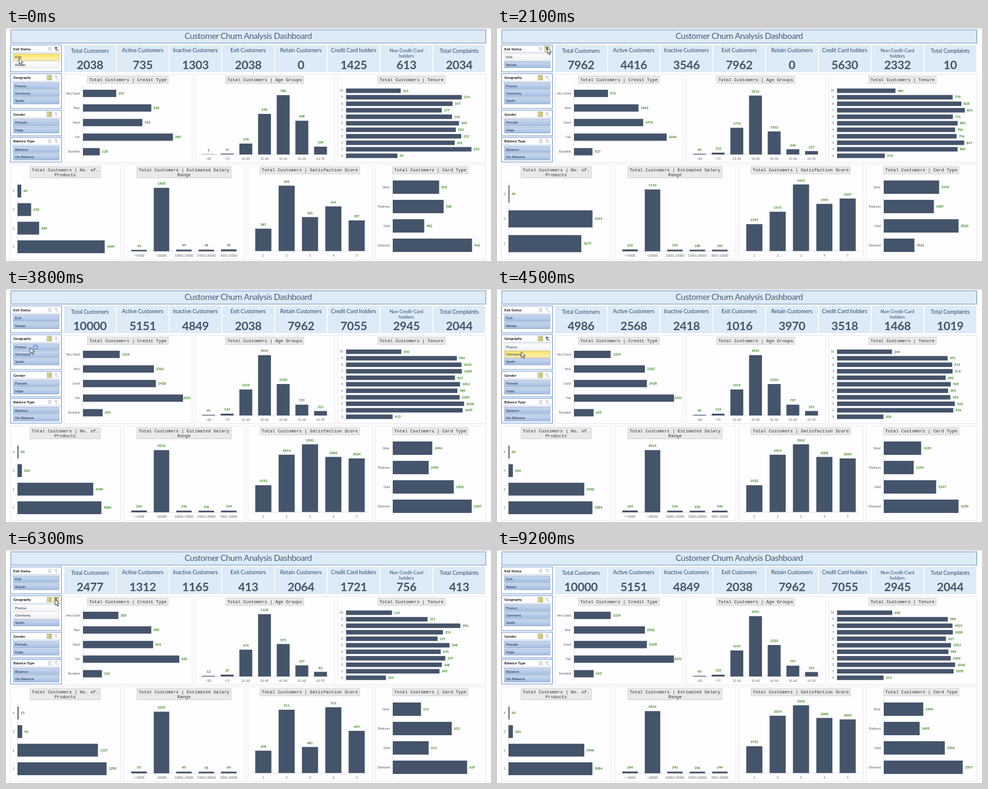
These frames come from a looping animation (800 by 385 pixels, 9300 ms). An HTML page:

```html
<!DOCTYPE html>
<html lang="en">
<head>
<meta charset="utf-8">
<title>Customer Churn Analysis Dashboard</title>
<style>
html, body { margin: 0; width: 100%; height: 100%; overflow: hidden; background: #fff; }
svg { display: block; width: 800px; height: 385px; font-family: Lato, "Open Sans", sans-serif; }
.title { font-size: 14px; letter-spacing: -.45px; fill: #4a5c78; text-anchor: middle; }
.name { font-size: 9px; letter-spacing: -.1px; fill: #2f4b70; text-anchor: middle; }
.small { font-size: 7.8px; }
.num { font-size: 19.5px; font-weight: 700; letter-spacing: -.3px; fill: #44546a; text-anchor: middle; }
.head { font: 7.35px "Liberation Mono", "Courier New", monospace; fill: #333; text-anchor: middle; }
.axis { font-size: 5px; fill: #595959; }
.val { font-size: 5.5px; font-weight: 700; fill: #348214; }
.slicer { font-size: 6px; font-weight: 700; fill: #111; }
.btn { font-size: 6.3px; fill: #1c2b40; }
.mid { text-anchor: middle; }
.end { text-anchor: end; }
</style>
</head>
<body>
<svg viewBox="0 0 800 385">
  <defs>
    <linearGradient id="on" x2="0" y2="1"><stop stop-color="#cbdaf0"/><stop offset="1" stop-color="#a4bde2"/></linearGradient>
    <linearGradient id="off" x2="0" y2="1"><stop stop-color="#fff"/><stop offset="1" stop-color="#f1f1f3"/></linearGradient>
    <linearGradient id="hot" x2="0" y2="1"><stop stop-color="#ffe366"/><stop offset="1" stop-color="#fff2b8"/></linearGradient>
  </defs>
  <g id="base"></g>
  <g id="live"></g>
</svg>
<script>
const LOOP = 9300, STEP = 100;
const EXIT = 0, RETAIN = 1, SPAIN = 2, NO_FRANCE = 3, ALL = 4;
const SHARE = { [SPAIN]: .2477, [NO_FRANCE]: .4986 };

// [ms, data set]; charts follow with their own lag
const plan = [[0, EXIT], [1100, RETAIN], [2700, ALL], [4300, NO_FRANCE], [5200, SPAIN], [7300, ALL]];
const SLOW = 350;

const kpis = {
  names: ['Total Customers', 'Active Customers', 'Inactive Customers', 'Exit Customers',
    'Retain Customers', 'Credit Card holders', 'Non Credit-Card\nholders', 'Total Complaints'],
  // total, active, leavers, card holders, complaints
  data: [[2038, 735, 2038, 1425, 2034], [7962, 4416, 0, 5630, 10], [2477, 1312, 413, 1721, 413]]
};

// sides: left and right of the panel; (x, y): plot corner on the value axis;
// len: value axis; span: category axis; data: leavers, stayers, then sets that need their own counts
const charts = [
  { title: 'Total Customers | Credit Type', sides: [96, 307], lag: SLOW,
    x: 127, y: 96, len: 173.3, span: 120.5, ratio: .5, edge: 305,
    cats: ['Very Good', 'Poor', 'Good', 'Fair', 'Excellent'],
    data: [[253, 520, 452, 685, 128], [971, 1842, 1976, 2646, 527]] },
  { title: 'Total Customers | Age Groups', sides: [312, 542], lag: SLOW,
    up: true, x: 318.6, y: 209, len: 112, span: 215.6,
    cats: ['<20', '>71', '21-30', '31-40', '41-50', '51-60', '61-70'],
    data: [[3, 11, 145, 539, 788, 448, 104], [46, 122, 1774, 3912, 1532, 349, 227]] },
  { title: 'Total Customers | Tenure', sides: [547, 791.5], lag: 150,
    x: 561, y: 98.3, len: 222.8, span: 118.2,
    cats: [10, 9, 8, 7, 6, 5, 4, 3, 2, 1, 0],
    data: [[101, 214, 197, 177, 196, 209, 203, 213, 201, 232, 95],
      [389, 770, 828, 851, 771, 803, 786, 796, 847, 803, 318],
      [119, 211, 296, 251, 237, 268, 245, 257, 248, 242, 103]] },
  { title: 'Total Customers | No. of.\nProducts', sides: [7, 189], low: true, lag: SLOW,
    x: 19, y: 254, len: 163.3, span: 122.8, ticks: 8,
    cats: [4, 3, 2, 1],
    data: [[60, 220, 349, 1409], [0, 46, 4241, 3675]] },
  { title: 'Total Customers | Estimated Salary\nRange', sides: [194, 394], low: true, lag: SLOW,
    up: true, x: 201, y: 369, len: 114, span: 185,
    cats: ['<=5000', '>20000', '10001-15000', '15001-20000', '5001-10000'],
    data: [[42, 1840, 49, 48, 59], [222, 7174, 193, 188, 185]] },
  { title: 'Total Customers | Satisfaction Score', sides: [399, 604], low: true, lag: SLOW,
    up: true, x: 405.2, y: 368.5, len: 123, span: 192.5,
    cats: [1, 2, 3, 4, 5],
    data: [[387, 439, 401, 414, 397], [1545, 1575, 1641, 1594, 1607],
      [478, 511, 481, 513, 494], [968, 1015, 1009, 988, 1006]] },
  { title: 'Total Customers | Card Type', sides: [609, 791.5], low: true, lag: 0,
    x: 638, y: 247, len: 148, span: 128,
    cats: ['Silver', 'Platinum', 'Gold', 'Diamond'],
    data: [[502, 508, 482, 546], [1994, 1987, 2020, 1961], [611, 623, 614, 629]] }
];

// The full set is leavers plus stayers; a region without its own counts takes its share
for (const { data } of [kpis, ...charts]) {
  data[ALL] = data[EXIT].map((v, i) => v + data[RETAIN][i]);
  for (const set in SHARE) data[set] ||= data[ALL].map(v => Math.round(v * SHARE[set]));
}

// off: spans in which a button is not selected
const slicers = [
  { title: 'Exit Status', y: 28, h: 44.5, filter: [0, 3000],
    items: ['Exit', 'Retain'], off: [[800, 3000], [0, 800]] },
  { title: 'Geography', y: 75.5, h: 57.5, multi: true, filter: [4200, 7200],
    items: ['France', 'Germany', 'Spain'], off: [[4200, 7200], [5400, 7200]] },
  { title: 'Gender', y: 136, h: 42, multi: true, items: ['Female', 'Male'] },
  { title: 'Balance Type', y: 180.5, h: 41, items: ['Balance', 'No Balance'] }
];

// [ms, x, y] of the pointer tip; it rests when a place repeats
const path = [[0, 21.5, 50], [300, 21.5, 50], [600, 24, 60], [1000, 24, 60], [1300, 72, 44],
  [1700, 83, 33], [2100, 83, 33], [2900, 49, 81], [3400, 40, 97], [4200, 40, 97], [4600, 40, 106],
  [5500, 40, 106], [6200, 81, 82], [7500, 81, 82], [8200, 60, -16]];

const text = (x, y, s, cls) =>
  `<text x="${x}" y="${y}" class="${cls}">${String(s).replace(/</g, '&lt;')}</text>`;
const rect = (x, y, w, h, fill, stroke = 'none', sw = 1) =>
  `<rect x="${x}" y="${y}" width="${w}" height="${h}" fill="${fill}" stroke="${stroke}" stroke-width="${sw}"/>`;
const line = (d, stroke, sw = .7) => `<path d="${d}" fill="none" stroke="${stroke}" stroke-width="${sw}"/>`;
const within = (t, span) => !!span && t >= span[0] && t < span[1];
const current = (t, lag = 0) => plan.findLast(([at]) => !at || at + lag <= t)[1];
const kpiX = i => 138.4 + 87 * i;

function drawPanel(c) {
  const [l, r] = c.sides, top = c.low ? 226 : 76.5, lines = c.title.split('\n');
  const w = lines[0].length * 4.42 + 5, h = lines[1] ? 18.5 : 12;
  const cx = (l + r) / 2 - .4, y = top + 3;
  return rect(l, top, r - l, c.low ? 156.5 : 146, '#fefdff', '#e2e2ea', .8)
    + rect(cx - w / 2, y, w, h, '#e9e9eb', '#c4c4c8', .7)
    + lines.map((s, i) => text(cx, y + 8 + 8 * i, s, 'head')).join('')
    + line(`M${c.x} ${c.y}${c.up ? 'h' : 'v'}${c.span}`, '#d6d6da');
}

function drawBase() {
  const cards = kpis.names.map((n, i) => {
    const lines = n.split('\n'), y = i % 7 ? 39.8 : 41;
    return rect(kpiX(i) - 42.5, 28, 85.6, 45, '#ddebf7')
      + lines.map((s, k) => text(kpiX(i), y + 8.8 * k, s, lines[1] ? 'name small' : 'name')).join('');
  });
  return rect(0, 0, 800, 1, '#d4d4d4') + rect(8, 3, 783.5, 22, '#ddebf7', '#6f92bd')
    + text(399.5, 18.2, 'Customer Churn Analysis Dashboard', 'title')
    + cards.join('') + charts.map(drawPanel).join('');
}

// Spreadsheet-style axis: starts near the smallest value when all are close together
function axis(values, ticks = 9) {
  const max = Math.max(...values), gap = max - Math.min(...values);
  const lo = gap < max / 6 ? max - 1.5 * gap : 0, hi = max + .05 * (max - lo);
  let step = 1;
  for (let i = 1; (hi - lo) / step > ticks; i++) step = [1, 2, 5][i % 3] * 10 ** Math.floor(i / 3);
  return [Math.floor(lo / step) * step, Math.ceil(hi / step) * step];
}

function drawChart(c, t) {
  const values = c.data[current(t, c.lag)];
  const rows = c.cats.map((n, i) => [n, values[i]]).filter(r => r[1]);
  const [lo, hi] = axis(rows.map(r => r[1]), c.ticks);
  const pitch = c.span / rows.length, thick = pitch * (c.ratio || .69);
  return rows.map(([name, v], i) => {
    const size = (v - lo) / (hi - lo) * c.len, at = (i + .5) * pitch;
    if (c.up) {
      const x = c.x + at, top = c.y - size;
      return rect(x - thick / 2, top, thick, size, '#44546a')
        + text(x, top - 4.8, v, 'val mid') + text(x, c.y + 9.3, name, 'axis mid');
    }
    const y = c.y + at, end = c.x + size, w = String(v).length * 3.15;
    return rect(c.x, y - thick / 2, size, thick, '#44546a')
      + text(Math.min(end + 3.6, (c.edge || 800) - w), y + 2, v, 'val')
      + text(c.x - 5, y + 1.8, name, 'axis end');
  }).join('');
}

function drawKpis(t) {
  const [total, active, leavers, cards, complaints] = kpis.data[current(t)];
  const left = leavers || total; // a lone group fills the first column
  return [total, active, total - active, left, total - left, cards, total - cards, complaints]
    .map((v, i) => text(kpiX(i), 67.8, v, 'num')).join('');
}

function icons(y, multi, active, hot) {
  const rows = [-2.4, 0, 2.4].map(d => `M69 ${y + d}h1.4M71.4 ${y + d}h3`).join('');
  return (multi ? rect(67.5, y - 4, 8, 8, '#f3ecaa', '#a39a58', .6) : '')
    + line(rows, multi ? '#5b6b3a' : '#8a94a4', .9)
    + (hot ? rect(78.5, y - 4.5, 9, 9, '#f3ecaa', '#a39a58', .6) : '')
    + `<path d="M79.5 ${y - 3}h6l-2.2 2.6v3.4l-1.6-1v-2.4z" fill="${active ? '#4c5868' : '#c9cdd4'}"/>`
    + line(`M83.8 ${y + .8}l2.8 2.8m0-2.8l-2.8 2.8`, active ? '#d0453a' : '#c9cdd4', .9);
}

function drawSlicer(s, t, p) {
  const hy = s.y + 6.5;
  const over = (l, r, y) => p.x > l && p.x < r && Math.abs(p.y - y) < 5.6;
  return rect(7.5, s.y, 84, s.h, '#fff', '#5b8cc8', .9)
    + text(12, hy + 2.2, s.title, 'slicer') + line(`M9 ${s.y + 12.8}h81`, '#8fb0da')
    + icons(hy, s.multi, within(t, s.filter), over(78.5, 88, hy))
    + s.items.map((name, i) => {
      const y = s.y + 20.2 + 12.2 * i, off = within(t, s.off && s.off[i]);
      const hot = !p.busy && over(12, 87.5, y);
      return rect(12.3, y - 5.2, 75, 10.4, `url(#${hot ? 'hot' : off ? 'off' : 'on'})`,
        hot ? '#c9ae55' : off ? '#d5d7dc' : '#8199bf', .7) + text(15, y + 2.2, name, 'btn');
    }).join('');
}

function pointer(t) {
  const i = path.findIndex(k => k[0] > t);
  if (i < 0) return { x: -50, y: -50 };
  const [t0, x0, y0] = path[i - 1], [t1, x1, y1] = path[i], u = (t - t0) / (t1 - t0);
  return { x: x0 + (x1 - x0) * u, y: y0 + (y1 - y0) * u, busy: within(t, [3500, 4400]) };
}

function drawPointer({ x, y, busy }) {
  const at = s => `<g transform="translate(${x} ${y})">${s}</g>`;
  if (x > 0 && x < 66 && y > 76 && y < 88) {
    const arms = [0, 90, 180, 270].map(a =>
      `<path transform="rotate(${a})" d="M-.6 0V-4h-1.6L0-6.6 2.2-4H.6V0z"/>`).join('');
    return at(`<g fill="#222" stroke="#fff" stroke-width="1.2" paint-order="stroke">${arms}</g>`);
  }
  return at('<path d="M0 0v9.4l2.2-2 1.6 3.7 1.6-.7-1.6-3.6h3z" fill="#fff" stroke="#222" stroke-width=".8"/>'
    + (busy ? '<circle cx="8.5" cy="-.5" r="3.6" fill="none" stroke="#6f9bd6" stroke-width="2"/>' : ''));
}

const base = document.getElementById('base'), live = document.getElementById('live');
base.innerHTML = drawBase();

let last = -1;
function frame() {
  const t = Math.floor(performance.now() % LOOP / STEP) * STEP;
  if (t !== last) {
    last = t;
    const p = pointer(t);
    live.innerHTML = drawKpis(t) + charts.map(c => drawChart(c, t)).join('')
      + slicers.map(s => drawSlicer(s, t, p)).join('') + drawPointer(p);
  }
  requestAnimationFrame(frame);
}
frame();
</script>
</body>
</html>
```
